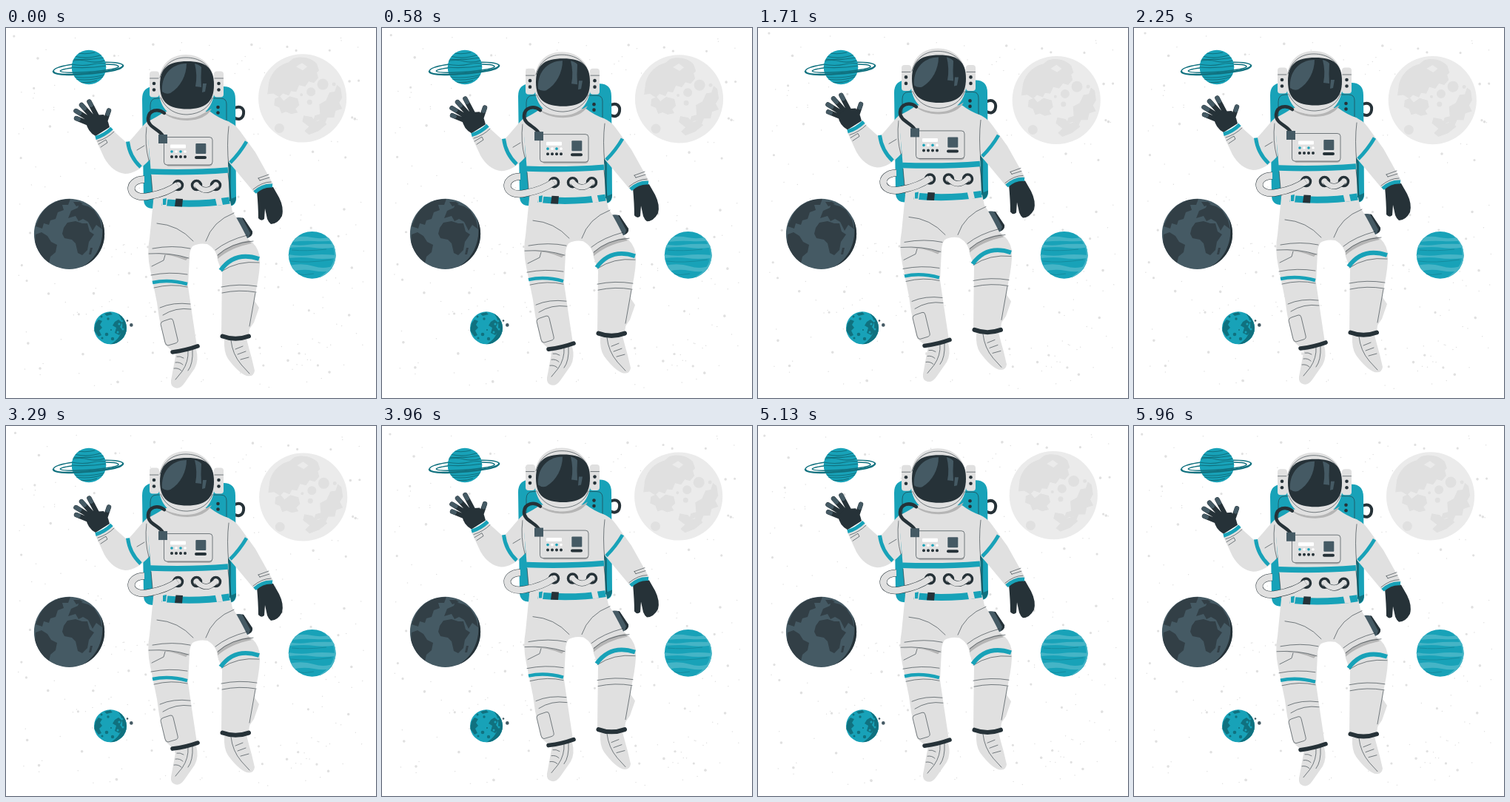
These frames come from a looping animation (500 px wide and 500 px high, 6 s). An HTML page:

```html
<!DOCTYPE html>
<html lang="en">
<head>
<meta charset="utf-8">
<title>Floating astronaut</title>
<style>
  html, body { margin: 0; width: 100%; height: 100%; overflow: hidden; background: #fff; }
  svg { display: block; width: 100vw; height: 100vh; }
  .suit { fill: #e0e0e0; }
  .teal { fill: #18a2b8; }
  .deep { fill: #10717f; }
  .dark { fill: #263238; }
  .slate { fill: #455a64; }
  .shade { fill: #b5b5b5; }
  .line { fill: none; stroke: #263238; stroke-width: .6; stroke-linecap: round; stroke-linejoin: round; }
  .band { fill: none; stroke: #18a2b8; }
  .strap { fill: none; stroke: #263238; stroke-linecap: round; }
  .tube { fill: none; stroke: #e0e0e0; }
  .tube .edge { stroke: #263238; }
</style>
</head>
<body>
<svg viewBox="0 0 500 500" xmlns="http://www.w3.org/2000/svg">
  <defs>
    <clipPath id="saturnClip"><circle cx="112" cy="53" r="23.3"/></clipPath>
    <clipPath id="earthClip"><circle cx="85.5" cy="278.3" r="47.6"/></clipPath>
    <clipPath id="icyClip"><circle cx="413.7" cy="306.8" r="31.9"/></clipPath>
    <clipPath id="crateredClip"><circle cx="141" cy="405.3" r="22"/></clipPath>
    <path id="visor" d="M208 77C208 54 219 45 245 45C270 45 281 54 281 77C281 101 268 109.500 245 109.500C220 109.500 208 101 208 77Z"/>
    <clipPath id="visorClip"><use href="#visor"/></clipPath>
    <path id="longHose" d="M232 212Q217 223 194 227C164 234 161 205 187 204.500"/>
    <path id="shortHose" d="M257.500 212Q270 226 283.500 212"/>
  </defs>

  <g id="sky">
    <g id="stars" fill="#e0e0e0"></g>
    <circle cx="401.4" cy="95.7" r="59.6" fill="#ebebeb"/>
    <g fill="#e0e0e0">
      <path d="M356 74C360 59 371 50 383 47L389 42C400 38 414 41 421 49L424 58L421 61L423 68L417 75L410 73L405 80L397 78L393 87L386 86L383 92L375 89L370 94L362 89L354 90Z"/>
      <path d="M364 96l7-3 5 6 8-6 11 3 2 9-5 5 3 5-9 2-7-3-6 2-3-8-7-3z"/>
      <path d="M424 104l9-5 5-11 7-1 3-9 5 4 2 13-4 7 4 8-9 3-2 9-9 0-3 7-9-4-8 4 3-10 7-2z"/>
      <path d="M403 119l11 2 5 6 9-2 6 6-11 9-13 5-6-5 6-6-9-7z"/>
      <circle cx="429" cy="77" r="7.5"/><circle cx="413" cy="87" r="6"/>
      <circle cx="370" cy="136" r="6.5"/><circle cx="411" cy="101" r="3.5"/>
      <circle cx="444" cy="77" r="2.5"/><circle cx="400" cy="91" r="2"/>
    </g>
    <path d="M393 53l8-5 7 5-6 5z" fill="#ebebeb"/>
  </g>

  <g id="ringed">
    <path d="M64 58C66 51 99 47 127 46C150 46 160 48 158 52" fill="none" stroke="#10717f" stroke-width="1.4"/>
    <circle class="teal" cx="112" cy="53" r="23.3"/>
    <g clip-path="url(#saturnClip)" fill="none" stroke="#10717f" stroke-width="1.1">
      <path d="M98 34q10 2 22-1M92 38q18 5 38-2M89 42q20 2 44-2M88 45q12-3 23 0t26-2M88 49q16 3 29 0t20 0M88 53q22 2 48-2"/>
      <path d="M91 66q20 3 44-3M93 69q20 3 38-3M98 73q14 2 25-2"/>
    </g>
    <g fill="none" stroke="#10717f">
      <path d="M64 58C63 63 80 64 105 62C135 60 160 56 158 50" stroke-width="2.4"/>
      <path d="M89 54C65 57 69 61 98 60C130 59 158 54 151 51C149 49 142 49 135 49" stroke-width="1.4"/>
    </g>
  </g>

  <g id="earth">
    <circle class="slate" cx="85.5" cy="278.3" r="47.6"/>
    <g clip-path="url(#earthClip)" fill="#323f46">
      <path d="M46 254C53 242 62 236 75 232L87 231L84 239L76 239L78 246L70 249L67 258L60 260L58 266L51 264L49 271L40 268Z"/>
      <path d="M40 279L48 276L56 281L61 289L69 293L67 303L60 309L58 318L48 309L39 293Z"/>
      <path d="M78 270L83 263L94 261L103 264L110 264L113 275L119 279L112 289L110 300L103 307L97 304L94 291L89 286L79 284L76 278Z"/>
      <path d="M84 257L88 247L97 243L99 238L111 241L119 246L127 259L130 272L122 266L117 274L111 262L104 258L98 261L94 254Z"/>
      <path d="M91 235l9 0 4 3-9 3zM114 297l3 0-2 9-3 0z"/>
      <path class="dark" d="M105 227C125 239 132 257 130 281C127 304 113 320 94 327L135 327L138 228Z"/>
    </g>
  </g>

  <g id="icy">
    <circle class="teal" cx="413.7" cy="306.8" r="31.9"/>
    <g clip-path="url(#icyClip)" fill="#45b4c6">
      <path d="M386 284q14-4 27-1t35-2v6q-18 2-31 1t-31 1zM381 292q14 3 26 1t40-1v4q-18 3-30 1t-36 0z"/>
      <path d="M381 306q16 3 30 1t36 0v4q-22 2-34 0t-32 0zM382 321q19-4 34 1t30-2v7q-15 4-30 1t-30 1z"/>
      <path d="M424 276C450 290 451 321 424 336L424 340L450 339V275Z"/>
      <path d="M386 300q20 2 47-1M385 315q22 3 55-2M391 332q12 3 25 0" fill="none" stroke="#148b9e" stroke-width="1"/>
    </g>
  </g>

  <g id="cratered">
    <circle class="teal" cx="141" cy="405.3" r="22"/>
    <g class="deep" clip-path="url(#crateredClip)">
      <path d="M149 384C162 394 160 419 140 428H166V384Z"/>
      <path d="M121 399l4-5 5 2-3 5 3 4-4 4 3 6-4 2-6-8zM133 386l8-2 3 3-8 2zM147 397l5-3 5 4-3 6 4 5-5 6-6-3 2-7-5-3z"/>
      <circle cx="138" cy="393" r="1.7"/><circle cx="136" cy="414" r="2.3"/><circle cx="144" cy="420" r="2.2"/>
      <circle cx="130" cy="419" r="1.5"/><circle cx="129" cy="390" r="1.5"/><circle cx="142" cy="408" r="1.1"/>
      <g class="teal"><circle cx="153" cy="400" r="1.6"/><circle cx="151" cy="411" r="1.5"/><circle cx="158" cy="407" r="1.5"/><circle cx="157" cy="396" r="1.2"/></g>
    </g>
    <circle class="slate" cx="164" cy="395.5" r="1.3"/>
    <circle class="slate" cx="169.3" cy="401.4" r="2.3"/>
  </g>

  <g id="astronaut">
    <g id="backpack">
      <path class="strap" d="M309 108C318 104 322 110 321 116C320 123 314 125 308 121" stroke-width="4"/>
      <path class="teal" d="M184 96Q184 79 201 79H294Q310 79 310 96L311 230Q311 241 300 241L212 244H199Q186 244 186 231Z"/>
      <path class="deep" d="M299 176L304 186V231L311 228Q311 240 300 241Z"/>
      <path class="line" d="M195 181V105Q195 95 204 95H213M277 95H290Q298 95 298 103V127"/>
      <circle class="dark" cx="286.5" cy="107" r="2.3"/><circle class="dark" cx="286.5" cy="114.5" r="2.3"/>
    </g>

    <g id="legs">
      <path class="slate" d="M309 257Q314 255 321 257L333 275Q334 280 325 285Z"/>
      <path class="dark" d="M319 256.500L321 257L333 275Q334 280 328 283L330 277Z"/>
      <path class="suit" d="M334 366L342 378L335 398L326 411L322 380Z"/>
      <path class="suit" d="M199 234H303L306 248Q313 258 326 284Q340 293 343 309Q344 326 338 354L328 414Q310 422 291 414L292 330L286 314Q285 299 272 292Q260 290 252 295Q248 301 248 309L246 349L252 390L258 430Q241 439 224 436L215 428L207 392L204 371L195 327Q190 304 194 284Z"/>
      <path class="shade" d="M194 306Q221 304 243 314L248 309Q223 304 194 306ZM286 312Q303 297 332 291L328 287Q303 292 286 306Z"/>
      <path class="suit" d="M193 305Q195 295 201 295Q230 296 249 295L247 311Q222 304 193 305Z"/>
      <path class="line" d="M204 264Q233 266 253 288M270 288Q279 261 308 250M193 305Q222 303 247 311M198 298Q225 293 249 298M286 307Q304 290 334 288M283 300Q299 287 326 280M215 307L213 314L197 322M196 334Q221 329 245 333M200 351Q224 345 245 350M208 378Q226 370 249 373M212 388Q229 377 250 380M291 350Q315 345 339 349M292 358Q315 353 338 357M291 329Q313 314 342 317M337 358L329 403"/>
      <path class="line" d="M209 400Q209 397 213 396L222 393Q225 392 226 396L232 421Q233 425 229 426L219 429Q216 429 215 425Z"/>
      <path class="band" d="M198 344Q220 339 245 346" stroke-width="4.5"/>
      <path class="band" d="M290 327.500Q309 301 342 312" stroke-width="5.800"/>
      <path class="suit" d="M230 438L257 434Q261 449 255 460L241 480Q234 490 226 485Q221 482 224 471Z"/>
      <path class="suit" d="M295 421L325 420Q328 432 332 446L336 463Q335 472 325 470Q314 466 300 447Q294 438 295 421Z"/>
      <path class="line" d="M231 444Q235 443 240 446M229 452Q235 451 239 455M227 460Q233 459 237 463M246 436Q247 451 238 464L229 475M252 435Q253 454 246 463M304 422Q306 441 318 455L329 467M310 434L320 430M313 441L324 437M317 448L328 445"/>
      <path class="strap" d="M225 438Q244 435.500 259 430" stroke-width="5.600"/>
      <path class="strap" d="M292.500 416.500Q310 423 328 416.500" stroke-width="6"/>
    </g>

    <g id="wavingArm">
      <g class="strap">
        <path d="M95 122L117 131M94.500 112L119 127M102 104L122 126M112.500 99.500L126 125M139 111.500L132 132" stroke-width="6.400"/>
        <path d="M95 122L98 123.200M94.500 112L99.500 115M102 104L106 108.500M112.500 99.500L115 104M139 111.500L137.500 116" stroke="#455a64" stroke-width="5.800"/>
      </g>
      <path class="dark" d="M108 127L118 118L132 117L138 127L140 134L121 146Q110 140 108 127Z"/>
      <path class="suit" d="M191 126C180 137 173 147 164 156L144 138L121 150L133 176Q144 195 161 197Q177 197 194 178Z"/>
      <path class="band" d="M121 148.500Q133 145 143 135.500" stroke-width="5"/>
      <path class="line" d="M124 153Q137 149 146 140M125 157L135 151L137 155L128 161M190 134Q187 157 193 179M177 165L187 159"/>
      <path class="band" d="M164.500 153.500Q167 174 182 188" stroke-width="5"/>
    </g>

    <g id="restingArm">
      <path class="suit" d="M297 125Q309 129 316 139L337 168L361 211Q351 213 336 223L311 193L299 179Z"/>
      <path class="dark" d="M339 220Q349 213 361 215L369 229Q376 243 373 254Q367 265 358 265Q355 263 353 258L350 244L349 258Q345 262 341 257Q341 242 339 220Z"/>
      <path class="band" d="M336 222Q347 212 360 213" stroke-width="5"/>
      <path class="band" d="M325 153.500Q316 169 303 182" stroke-width="4.800"/>
      <path class="line" d="M334 218Q346 208 358 208M341 203L355 198M343 206L356 202M341 203L343 206"/>
    </g>

    <g id="torso">
      <path class="suit" d="M190 127Q205 120 214 113H276Q286 121 302 127L300 178L302 235Q252 242 199 235L195 184Z"/>
      <path class="shade" d="M211 113Q243 132 278 109Q270 124 245 125Q223 125 211 113Z"/>
      <path class="line" d="M301 133Q298 157 301 187M196 199L199 232M300 196L304 231"/>
      <path class="band" d="M195 194Q250 196 300 192" stroke-width="7.500"/>
      <path class="band" d="M211 235.500Q258 240 302 233" stroke-width="9"/>
      <path class="dark" d="M229.500 230.500L239 231L238 241.500L228 241Z"/>
      <path class="suit" d="M211 227H219L217 241H211ZM282 227L290 226L293 239L285 240Z"/>
      <path class="teal" d="M212 231L217 230L216 239H212Z"/>

      <path class="shade" d="M214 183L219 187H274Q279 187 279 182Z"/>
      <rect class="suit" x="213.500" y="147.500" width="65.500" height="37.500" rx="4"/>
      <rect class="line" x="213.500" y="147.500" width="65.500" height="37.500" rx="4"/>
      <rect x="222" y="157.500" width="21" height="5" rx="1" fill="#fff"/>
      <rect class="slate" x="256.300" y="156" width="14" height="14" rx="1"/>
      <rect class="dark" x="255" y="173" width="16" height="4" rx="2"/>
      <g id="buttons"></g>
      <path class="strap" d="M212 146C208 137 191 134 192 122C193 111 205 108 214 115" stroke-width="4.5"/>
      <rect class="slate" x="206" y="144" width="12" height="12"/>

      <g class="strap" stroke-width="3.500">
        <circle cx="232.500" cy="212.500" r="6"/><circle cx="257.500" cy="212.500" r="6"/><circle cx="283.500" cy="212.500" r="6"/>
      </g>
      <g class="tube">
        <use class="edge" href="#longHose" stroke-width="9.800"/>
        <use href="#longHose" stroke-width="8.800"/>
        <use class="edge" href="#shortHose" stroke-width="7.800"/>
        <use href="#shortHose" stroke-width="6.800" stroke-linecap="round"/>
      </g>
    </g>

    <g id="head">
      <rect class="suit" x="194" y="58.500" width="13" height="35" rx="4"/>
      <rect class="suit" x="281" y="58.500" width="13" height="35" rx="4"/>
      <path class="line" d="M194.500 68H206M282 68H293.500"/>
      <g class="dark"><circle cx="200" cy="75" r="2.300"/><circle cx="200" cy="83.500" r="2.300"/><circle cx="287.500" cy="75" r="2.300"/><circle cx="287.500" cy="83.500" r="2.300"/></g>
      <path class="suit" d="M206 78C206 52 220 36 243 36C266 36 282 53 282 78C282 107 267 122 243 122C219 122 206 106 206 78Z"/>
      <path class="line" d="M208 67C213 49 226 40 243 40C261 40 275 49 279 65M209 94C216 110 229 117 245 117C263 116 275 107 279 94"/>
      <use class="dark" href="#visor"/>
      <g class="slate" clip-path="url(#visorClip)">
        <path d="M211 86C209 66 222 48 244 48C244 63 236 80 222 88Q216 90 211 86Z"/>
        <path d="M255 48Q262 50 264 53Q263 67 264 80L256 79Q259 64 255 48ZM266 75L271 75L269 86L265 87Z"/>
      </g>
    </g>
  </g>
</svg>
<script>
  const LOOP = 6000;
  const sky = document.getElementById("sky");
  const astronaut = document.getElementById("astronaut");

  const dot = (x, y, r, fill) =>
    `<circle cx="${x.toFixed(1)}" cy="${y.toFixed(1)}" r="${r}"${fill ? ` fill="${fill}"` : ""}/>`;

  function seeded(seed) {
    return () => (seed = (seed * 16807) % 2147483647) / 2147483647;
  }

  function makeStars() {
    const rand = seeded(4217);
    const bright = [[44, 40], [200, 22], [60, 132], [50, 282], [57, 358], [29, 425], [45, 459],
      [103, 440], [166, 331], [118, 358], [415, 168], [465, 73], [472, 124], [457, 246],
      [467, 325], [463, 389], [150, 478], [333, 23], [436, 466], [380, 450]];
    let markup = bright.map(([x, y]) => dot(x, y, 1.8)).join("");
    for (let i = 0; i < 300; i++) {
      markup += dot(12 + rand() * 474, 9 + rand() * 477, i % 6 ? 0.75 : 1.6);
    }
    document.getElementById("stars").innerHTML = markup;
  }

  function makeButtons() {
    const tops = ["#18a2b8", "#fff", "#18a2b8", "#fff"];
    document.getElementById("buttons").innerHTML = tops.map((color, i) =>
      dot(224 + i * 6, 167, 1.8, color) + dot(224 + i * 6, 174, 2, "#263238")).join("");
  }

  // Triangle wave: 0 at the start of a period, 1 halfway through.
  const triangle = (time, period) => {
    const phase = ((time / period) % 1 + 1) % 1;
    return 1 - Math.abs(2 * phase - 1);
  };

  function draw(time) {
    const lift = -10 * triangle(time, LOOP / 2);
    const tilt = 2 * triangle(time + 1000, LOOP) - 1;
    astronaut.setAttribute("transform", `translate(0 ${lift.toFixed(3)})`);
    sky.setAttribute("transform", `rotate(${(tilt * 0.85).toFixed(4)} 250 250)`);
  }

  makeStars();
  makeButtons();
  const start = performance.now();
  function tick() {
    draw((performance.now() - start) % LOOP);
    requestAnimationFrame(tick);
  }
  draw(0);
  tick();
</script>
</body>
</html>
```
